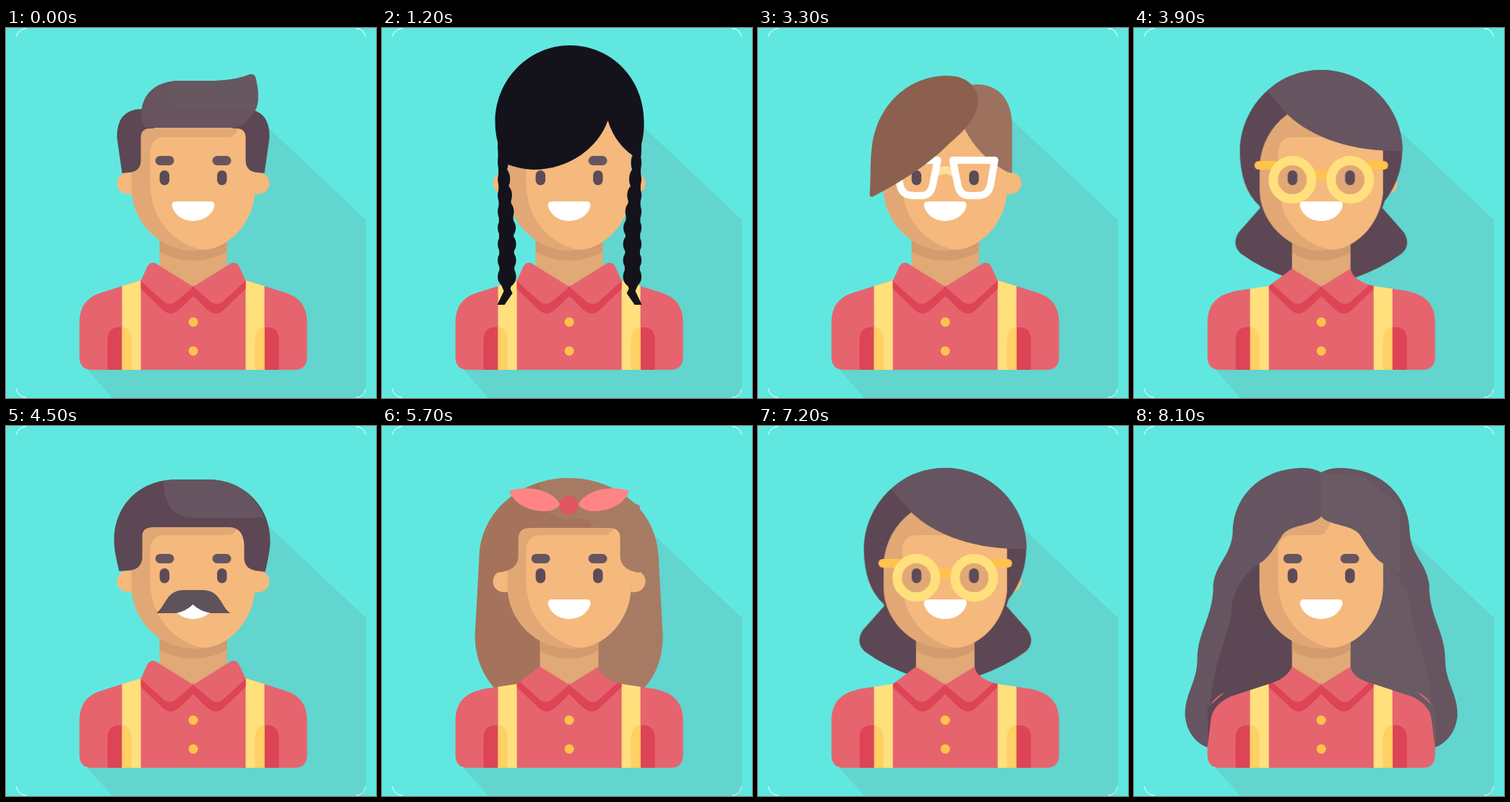
An HTML page that plays this animation: 512x512 px, repeating every 8400 ms.

```html
<!DOCTYPE html>
<html lang="en">
<head>
<meta charset="utf-8">
<title>Avatars</title>
<style>
html, body { margin: 0; width: 100%; height: 100%; overflow: hidden; background: #60e8e0; }
svg { display: block; width: 100vw; height: 100vh; }
#strip { animation: flip 8400ms steps(28) infinite; }
@keyframes flip { to { transform: translateX(-14336px); } }
</style>
</head>
<body>
<svg id="stage" viewBox="0 0 512 512"></svg>
<script>
const C = {
  skin: '#f5b97d', shade: '#e1a876', neck: '#e1a976', neckDark: '#d39b6e',
  red: '#e6646e', redDark: '#dd4456', yellow: '#ffe07d', amber: '#ffd064', gold: '#ffc34c',
  dark: '#5d4754', mid: '#665560', light: '#6a5a64', black: '#14131c',
  brown: '#8b604f', brownLight: '#9c725f', tan: '#a5725c', tanLight: '#a77b63'
};
const path = (fill, d) => `<path fill="${fill}" d="${d}"/>`;
const rect = (fill, x, y, w, h, r = 0) =>
  `<rect fill="${fill}" x="${x}" y="${y}" width="${w}" height="${h}" rx="${r}"/>`;
const circle = (fill, x, y, r) => `<circle fill="${fill}" cx="${x}" cy="${y}" r="${r}"/>`;
const flipX = (s, sum = 519) => `<g transform="matrix(-1 0 0 1 ${sum} 0)">${s}</g>`;
const both = (s, sum) => s + flipX(s, sum);

const backdrop = rect('#60e8e0', 0, 0, 512, 512) +
  path('#62d5ce', 'M330 200L345 121L498.5 266V498Q498 512 484 512H147L113 473Z') +
  `<g fill="none" stroke="#fff">${both(
    '<path d="M14.5 12Q16 2 28 .5M14.5 499Q16 510 28 511.5"/>', 512)}</g>`;

const shirt =
  path(C.red, 'M120 473Q102 473 102 455V407Q102 375 133 366L190 348L259.5 358L329 348L386 366Q417 375 417 407V455Q417 473 399 473Z') +
  both(
    path(C.redDark, 'M141 473V431Q141 414 158 414Q174 414 174 431V473Z') +
    path(C.yellow, 'M161 357L187 349V473H161Z') +
    path(C.amber, 'M161 414Q174 416 174 431V473H161Z') +
    path(C.redDark, 'M187 349V361L217 390Q228 400 240 390L259.5 371V357Z') +
    path(C.red, 'M187 350L195 332Q200 322 208 326L259.5 358L235 379Q227 385 219 379Z')
  ) +
  circle(C.gold, 259.5, 407, 6.5) + circle(C.gold, 259.5, 447, 6.5);

const neck = (x, w) => {
  const r = x + w;
  return path(C.neck, `M${x} 280H${r}V334L259.5 360L${x} 334Z`) +
    path(C.neckDark, `M${x} 280H${r}V310Q282 322 259 322Q236 322 ${x} 310Z`);
};

// edge: where the forehead shadow turns up into the hairline
const face = edge =>
  path(C.shade, 'M174 118H345V222C345 270 305 308 259 308C215 308 174 270 174 222Z') +
  path(C.skin, `M200 172Q200 151 222 151H${edge}Q${edge + 12} 149 ${edge + 18} 118H345V222C345 268 309 306 273 307C230 298 200 262 200 215Z`);

const ear = rect(C.skin, 154, 200, 32, 30, 15);
const brows = both(rect(C.mid, 207, 177, 26, 13, 6.5));
const eyes = both(rect('#5d4b58', 213, 197, 13.5, 20.5, 6.7));
const mouth = path('#fff', 'M230 245Q230 240 236 240H283Q289 240 289 245C287 258 274 267 259 267C245 267 232 258 230 245Z');
const tache = path('#5f535b', 'M208 259C222 250 221 227 247 227H272C298 227 297 250 311 259H284Q268 256 259 247Q250 256 236 259Z');

const squareGlasses =
  '<path fill="none" stroke="#fbe09c" stroke-width="10" d="M248 201Q259 192 271 201"/>' +
  `<g fill="none" stroke="#fff" stroke-width="10" stroke-linejoin="round">${both(
    '<path d="M270 183H328L322 218Q319 232 303 232H293Q280 232 277 218Z"/>')}</g>`;
const roundGlasses =
  rect(C.gold, 250, 197, 19, 13) +
  both(rect(C.gold, 167, 184, 36, 12, 6) +
    `<circle fill="${C.shade}" stroke="${C.yellow}" stroke-width="13" cx="219.5" cy="210" r="26.5"/>`);

const braid = () => {
  let s = path(C.black, 'M161 150H171L173 200L182 262L184 345H163L162 250Z');
  for (let i = 0; i < 9; i++) {
    const w = Math.min(25.5, 12 + i * 2.6);
    s += `<ellipse fill="${C.black}" cx="${160.5 + w / 2}" cy="${164 + i * 22.5}" rx="${w / 2}" ry="15"/>`;
  }
  return s + path(C.black, 'M163 350H181L178 361L181 367L170 383H160L169 364Z');
};

const bowLeaf = path('#ff8585', 'M176 90C195 83 232 84 247 108C242 119 220 121 200 113Q183 106 176 90Z');
const wavy = fill => path(fill, 'M259.5 64Q248 58 235 58C178 58 138 95 137 147C135 180 114 188 110 220C111 262 88 285 88 322C88 355 71 368 71 400C73 425 88 440 103 445H259.5Z');
const innerLock = fill => path(fill, 'M174 190C150 205 134 235 135 260C130 300 104 325 103 445H259.5V190Z');
const curtain = fill => path(fill, 'M259.5 64V125C249 139 216 135 205 152C195 168 185 185 174 190L150 205V110L200 70Z');
const shoulderLock = fill => path(fill, 'M219 333Q212 349 190 356L135 374Q110 385 107 405L102 445V390L133 362L190 345Z');

// back is behind the head, wear under the fringe, front and over on top;
// slim narrows neck and collar
const people = [
  {
    front: both(path(C.dark, 'M161 201L154 152Q153 113 188 112H205V139H200Q187 139 187 152V183Q187 199 170 200Z')) +
      path('#67545f', 'M188 125C185 95 205 73 240 73H290C315 72 328 68 338 64Q345 63 346 70C352 95 350 112 340 121Q330 138 312 138H200Q188 138 188 125Z') +
      path('#675860', 'M233 73H290C315 72 328 68 338 64Q345 63 346 70C351 90 350 104 346 112H244C224 111 220 88 233 73Z')
  },
  {
    edge: 258,
    front: both(braid(), 520) +
      path(C.black, 'M161 185V160C158 148 157 140 157 130C157 70 205 24 260 24C318 24 363 70 363 130C363 142 362 152 359 162V176H347C335 168 320 152 313 128C300 165 260 196 210 196Q190 195 172 188Z')
  },
  {
    edge: 258, ears: flipX(ear), brows: '', wear: squareGlasses,
    front: path(C.brown, 'M155 230C157 200 155 190 158 165C165 105 210 66 262 66C290 66 305 82 305 102C303 125 285 143 265 160C235 190 200 212 160 233Q155 235 155 230Z'),
    side: path(C.brownLight, 'M287 141Q305 175 335 193Q343 199 352 201V130C350 95 330 78 303 78Q290 78 275 90Z')
  },
  {
    wear: tache,
    front: path(C.dark, 'M157 201C152 180 150 170 150 158C150 110 185 74 236 74H280C330 74 366 112 366 158C366 170 363 185 359 202L345 200Q330 197 330 182V165Q329 141 310 140H205Q189 140 189 152V183Q187 199 170 200Z') +
      path(C.mid, 'M218 77C220 110 232 127 260 127H358C345 95 318 74 280 74H236Q226 74 218 77Z')
  },
  {
    slim: true,
    back: path(C.tan, 'M157 364C140 345 129 320 129 290L135 180C138 115 195 72 259 72V364Z') +
      path(C.tanLight, 'M219 79Q238 72 259 72C323 72 380 115 383 180L389 290C389 320 380 345 362 364H259Z'),
    front: path(C.tan, 'M160 203Q189 200 189 180V155Q190 141 205 141H291V115H170Z') +
      path(C.tanLight, 'M219 79Q219 127 255 128H280Q291 130 291 141H315Q330 141 330 155V182Q332 200 357 203V110L300 85Z') +
      both(bowLeaf) + circle('#e0555f', 259, 110, 13)
  },
  {
    slim: true, edge: 258, ears: '', brows: '',
    back: both(ear) + circle(C.dark, 259.5, 170, 112) +
      both(path(C.dark, 'M175 249L145 283Q135 300 148 312Q175 332 214 346Q219 347 219 335V240H172Z')),
    front: path(C.dark, 'M147 170C147 135 165 105 185 88L213 119Q178 145 174 190V246Q147 222 147 170Z') +
      path(C.mid, 'M185 88C200 70 230 58 259 58C320 58 372 108 372 170C310 172 250 155 213 120Z'),
    over: roundGlasses + eyes + mouth
  },
  {
    slim: true, edge: 258, ears: '',
    back: wavy(C.mid) + innerLock(C.dark) + flipX(wavy(C.mid) + innerLock(C.light)),
    front: curtain(C.mid) + shoulderLock(C.dark) + flipX(curtain(C.light) + shoulderLock(C.light))
  }
];

const draw = ({ slim, edge = 310, ears = both(ear), back = '', side = '', wear = '', front, over = '', ...p }) =>
  back + (slim ? neck(219, 81) : neck(213, 93)) +
  `<g${slim ? ' clip-path="url(#slim)"' : ''}>${shirt}</g>` +
  ears + face(edge) + side + (p.brows ?? brows) + eyes + mouth + wear + front + over;

const order = '0432105240523503520432405346';
document.getElementById('stage').innerHTML =
  '<defs><clipPath id="slim"><path d="M80 512V380L140 364L187 357L219 333L259 345L300 333Q303 350 332 357L379 364L440 380V512Z"/></clipPath>' +
  people.map((p, i) => `<g id="p${i}">${draw(p)}</g>`).join('') + '</defs>' + backdrop +
  `<g id="strip">${[...order].map((n, i) => `<use href="#p${n}" x="${i * 512 - 0.4}"/>`).join('')}</g>`;
</script>
</body>
</html>
```
